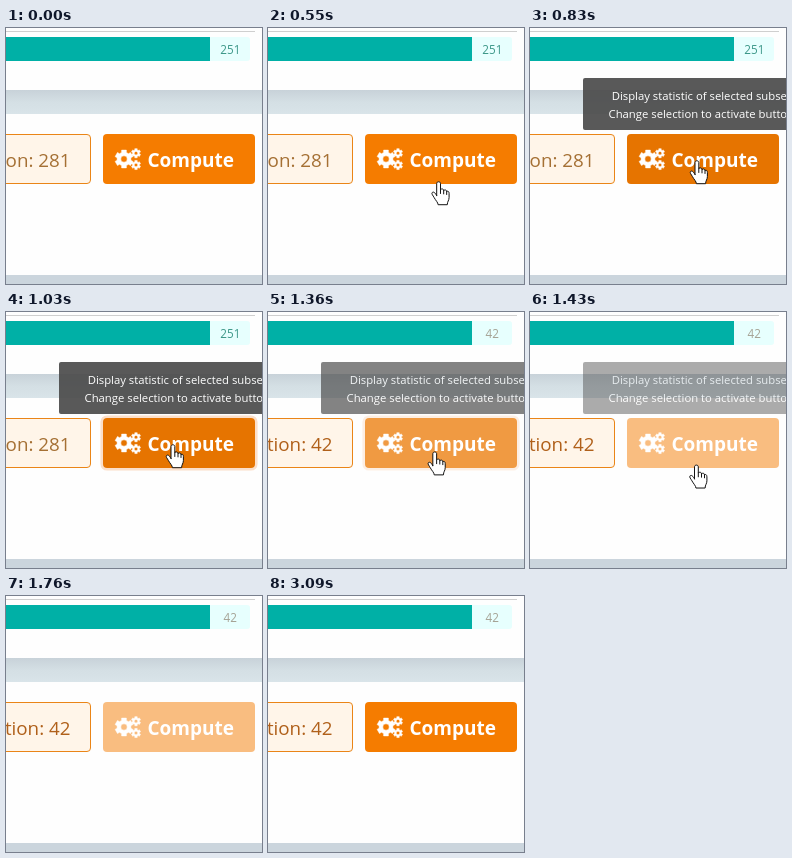
Animation of 256 by 256 pixels, one loop 4220 ms. Source, as an HTML page:

```html
<!DOCTYPE html>
<html lang="en">
<head>
<meta charset="utf-8">
<title>Compute button</title>
<style>
  html, body { margin: 0; width: 100%; height: 100%; overflow: hidden; background: #fefefe; }
  svg { display: block; width: 100vw; height: 100vh; }
  text { font-family: "Open Sans", "Noto Sans", sans-serif; }
</style>
</head>
<body>
<svg viewBox="0 0 256 256">
  <defs>
    <linearGradient id="gap" x1="0" y1="0" x2="0" y2="1">
      <stop offset="0" stop-color="#c8d2d9"/>
      <stop offset=".5" stop-color="#d4dfe4"/>
      <stop offset="1" stop-color="#d9e4e9"/>
    </linearGradient>
  </defs>

  <rect width="256" height="256" fill="#fefefe"/>
  <rect y="62" width="256" height="24" fill="url(#gap)"/>
  <rect y="247" width="256" height="9" fill="#cbd5dd"/>
  <rect y="3" width="249" height="1" fill="#cfcfcf"/>

  <rect x="190" y="9" width="54" height="24" rx="3" fill="#e7fffe"/>
  <rect y="9" width="204" height="24" fill="#00b0a6"/>
  <text id="barLabel" x="224.3" y="25.7" font-size="11.7" text-anchor="middle"></text>

  <rect x="-120" y="106.5" width="204.5" height="49" rx="3.5" fill="#fff5e9" stroke="#ea8517"/>
  <text id="selection" x="64.5" y="138.8" font-size="18.8" text-anchor="end"></text>

  <rect id="ring" x="95.7" y="104.7" width="154.6" height="52.6" rx="5.3" fill="none" stroke="#fbdfca" stroke-width="2.6"/>
  <rect id="button" x="97" y="106" width="152" height="50" rx="4"/>
  <path id="gears" fill="#fff" fill-rule="evenodd" stroke="#fff" stroke-width=".5" stroke-linejoin="round"/>
  <text x="141.5" y="138.8" font-size="19" font-weight="700" fill="#fff">Compute</text>

  <g id="tooltip">
    <rect x="53" y="50" width="240" height="52" rx="2" fill="#4b4b4b" fill-opacity=".92"/>
    <g font-size="11.3" font-weight="500" fill="#fff">
      <text x="81.7" y="72">Display statistic of selected subset.</text>
      <text x="78.5" y="90">Change selection to activate button.</text>
    </g>
  </g>

  <g id="cursor" stroke="#111" stroke-linejoin="round" stroke-linecap="round">
    <path fill="#fff" d="M-2 14V2C-2-.3 1.8-.3 1.8 2V8C3 7 5 7.3 5 9C6 8 8 8.3 8 10C9.2 9.2 10.4 10 10.4 12V16C10.4 19 8.6 20 8.6 23.2H-.6C-.6 21-3 19-4.6 16C-5.6 14-7.6 12.3-6.4 11C-5 9.8-3.4 11.4-2 14Z"/>
    <path fill="none" d="M1.8 8V12M5 9V12.4M8 10V13"/>
  </g>
</svg>

<script>
const LOOP = 4220, TICK = 70;
const ENTER = 130, HOVER = 620, ARRIVE = 690, FOCUSED = 1030;
const CLICK = 1290, UPDATE = 1360, LEFT = 1760, READY = 3090;

const el = id => document.getElementById(id);
const set = (id, name, value) => el(id).setAttribute(name, value);
const ramp = (t, from, to) => Math.min(1, Math.max(0, (t - from) / (to - from)));

// The picture advances in ticks, counted from the start of each phase
function snap(t) {
  if (t < ENTER) return 0;
  if (t >= FOCUSED && t < UPDATE) return FOCUSED;
  const start = t < FOCUSED ? ENTER : UPDATE;
  return start + TICK * Math.floor((t - start) / TICK);
}

function gear(x, y, outer, inner, hole) {
  const points = [];
  const add = (r, deg) => {
    const a = deg * Math.PI / 180;
    points.push(`${x + r * Math.cos(a)} ${y + r * Math.sin(a)}`);
  };
  for (let a = 30; a < 390; a += 60) {
    add(inner, a - 20);
    add(outer, a - 15);
    add(outer, a + 15);
    add(inner, a + 20);
  }
  return `M${points.join("L")}Z M${x - hole} ${y}a${hole} ${hole} 0 1 0 ${2 * hole} 0` +
    `a${hole} ${hole} 0 1 0 ${-2 * hole} 0Z`;
}

function buttonColor(now) {
  if (now < HOVER || now >= READY) return "#f57c00";
  if (now < UPDATE) return "#e67400";
  return now < UPDATE + TICK ? "#f09a42" : "#f9bd80";
}

function drawCursor(now, t) {
  const away = (1 - ramp(t, ENTER, ARRIVE)) ** 1.22;
  const leave = ramp(t, CLICK, LEFT) ** 1.5;
  const x = 167 + 20 * away - 3 * leave;
  const y = 132.5 + 114 * away + 125 * leave;
  set("cursor", "transform", `translate(${x} ${y})`);
  set("cursor", "visibility", now >= ENTER && now < LEFT ? "visible" : "hidden");
}

function draw(time) {
  const now = time % LOOP;
  const t = snap(now);
  const updated = now >= UPDATE;

  el("barLabel").textContent = updated ? 42 : 251;
  set("barLabel", "fill", updated ? "#a5a294" : "#3c9788");
  el("selection").textContent = `Selection: ${updated ? 42 : 281}`;
  set("selection", "fill", updated ? "#b0601a" : "#a57034");
  set("button", "fill", buttonColor(now));
  set("ring", "opacity", ramp(t, 830, FOCUSED) * (1 - ramp(t, CLICK, UPDATE + TICK)));
  set("tooltip", "opacity", now < HOVER ? 0 : 1 - ramp(t, CLICK, CLICK + 4 * TICK));
  drawCursor(now, t);
}

set("gears", "d", gear(118, 131, 9.2, 7, 3.2) +
  gear(130, 125.2, 4.7, 3.4, 1.8) + gear(130, 137, 4.7, 3.4, 1.8));

const start = performance.now();
function tick() {
  draw(performance.now() - start);
  requestAnimationFrame(tick);
}
tick();
</script>
</body>
</html>
```
